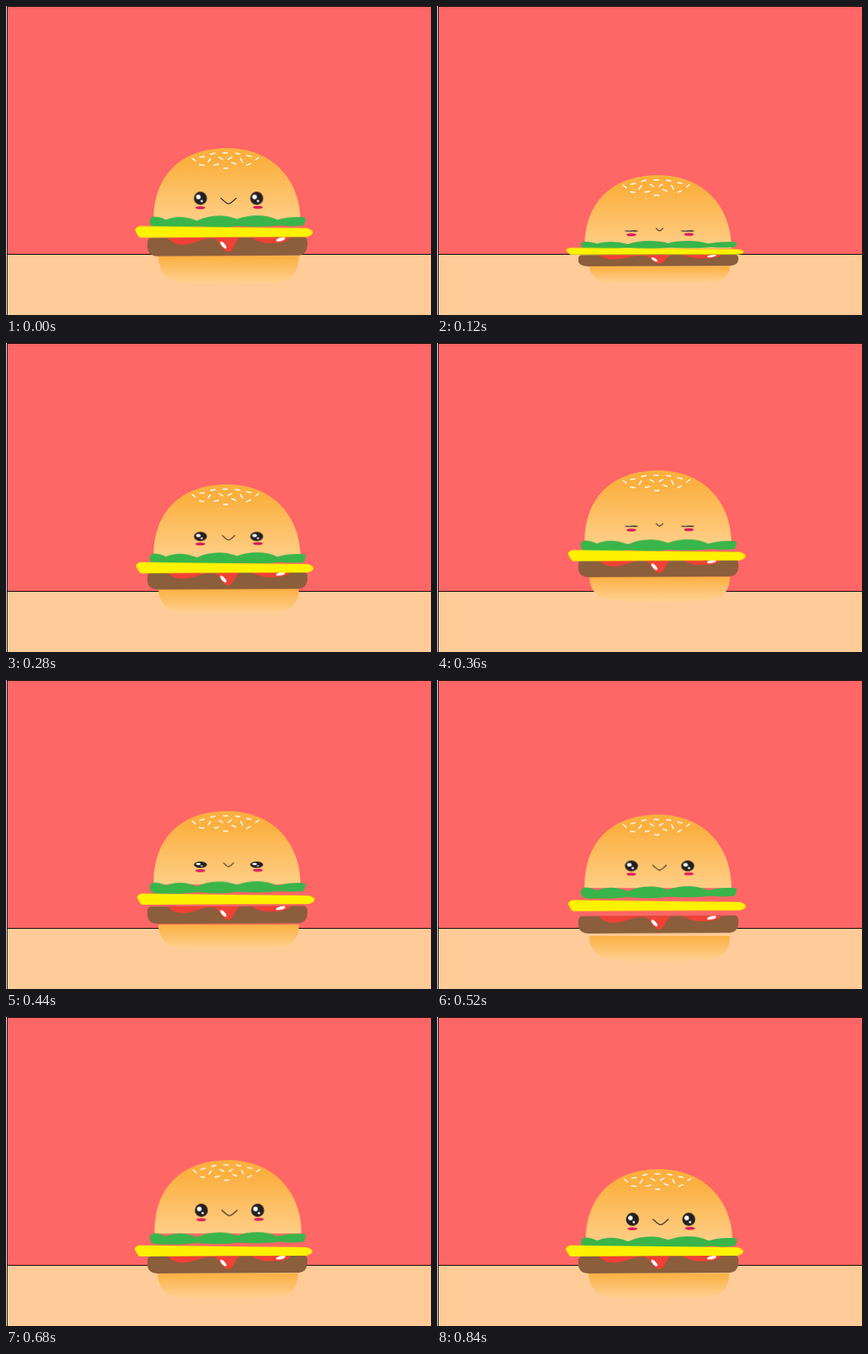
Recreate the animation shown at these times as an HTML page. Size 550 by 400 pixels, loop 2.4 s.

```html
<!DOCTYPE html>
<html lang="en">
<head>
<meta charset="utf-8">
<title>Hopping burger</title>
<style>
html, body { margin: 0; width: 100%; height: 100%; overflow: hidden; background: #fff; }
svg { display: block; width: 550px; height: 400px; }

/* Each layer sits at y = 0 locally; keyframes place it. Steps of 40 ms. */
.part { animation: 2400ms infinite; }
#base { animation-name: base; }
#patty { animation-name: patty; }
#lettuce { animation-name: lettuce; }
#cheese { animation-name: cheese; }
#bun { animation-name: bun; }
.eye { animation-name: blink; }
#mouth { animation-name: pout; }

@keyframes base {
  0% { transform: translate(0px, 360px) scale(1, 1.13); animation-timing-function: steps(3); }
  5% { transform: translate(0px, 359px) scale(1, .68); animation-timing-function: steps(3); }
  10% { transform: translate(0px, 358px) scale(1, 1); animation-timing-function: steps(3); }
  15% { transform: translate(0px, 334.5px) scale(1, 1); animation-timing-function: steps(4); }
  21.6667% { transform: translate(0px, 363.5px) scale(1, 1); animation-timing-function: steps(1); }
  23.3333% { transform: translate(-.3px, 364px) scale(1, 1); animation-timing-function: steps(3); }
  28.3333%, 100% { transform: translate(-1px, 364.3px) scale(1, 1); }
}
@keyframes patty {
  0% { transform: translate(0px, 324px) scale(1, 1.07); animation-timing-function: steps(3); }
  5% { transform: translate(0px, 337px) scale(1, .65); animation-timing-function: steps(3); }
  10% { transform: translate(0px, 327.2px) scale(1, 1); animation-timing-function: steps(3); }
  15% { transform: translate(0px, 303.2px) scale(1, 1); animation-timing-function: steps(4); }
  21.6667% { transform: translate(0px, 328.2px) scale(1, 1); animation-timing-function: steps(1); }
  23.3333%, 100% { transform: translate(0px, 332px) scale(1, 1); }
}
@keyframes lettuce {
  0% { transform: translate(0px, 287.5px) scale(1, 1.02); animation-timing-function: steps(3); }
  5% { transform: translate(0px, 314.4px) scale(1, .65); animation-timing-function: steps(3); }
  10% { transform: translate(0px, 295.5px) scale(1, 1); animation-timing-function: steps(3); }
  15% { transform: translate(0px, 270.2px) scale(1, 1); animation-timing-function: steps(5); }
  23.3333% { transform: translate(0px, 286.2px) scale(1, 1); animation-timing-function: steps(5); }
  31.6667%, 100% { transform: translate(.3px, 300px) scale(1, 1); }
}
@keyframes cheese {
  0% { transform: translate(0px, 300px) scale(1, 1.04); animation-timing-function: steps(3); }
  5% { transform: translate(0px, 322.3px) scale(1, .64); animation-timing-function: steps(3); }
  10% { transform: translate(.3px, 306px) scale(1, 1); animation-timing-function: steps(3); }
  15% { transform: translate(2.3px, 282.5px) scale(1, 1); animation-timing-function: steps(5); }
  23.3333% { transform: translate(2.5px, 303.5px) scale(1, 1); animation-timing-function: steps(3); }
  28.3333%, 100% { transform: translate(-.6px, 310px) scale(1, 1); }
}
@keyframes bun {
  0% { transform: translate(0px, 184px); animation-timing-function: steps(3); }
  5% { transform: translate(0px, 219px); animation-timing-function: steps(6); }
  15% { transform: translate(0px, 165px); animation-timing-function: steps(5); }
  23.3333% { transform: translate(0px, 176.5px); animation-timing-function: steps(3); }
  28.3333% { transform: translate(1.2px, 185.3px); animation-timing-function: steps(4); }
  35%, 100% { transform: translate(1.4px, 197px); }
}
@keyframes blink {
  0%, 10% { transform: scale(1, 1); animation-timing-function: steps(3); }
  5% { transform: scale(1, .12); animation-timing-function: steps(3); }
  15% { transform: scale(1, .12); animation-timing-function: steps(5); }
  23.3333%, 100% { transform: scale(1, 1); }
}
@keyframes pout {
  0%, 10% { transform: scale(1); animation-timing-function: steps(3); }
  5% { transform: scale(.45); animation-timing-function: steps(3); }
  15% { transform: scale(.45); animation-timing-function: steps(5); }
  23.3333%, 100% { transform: scale(1); }
}
</style>
</head>
<body>
<svg viewBox="0 0 550 400">
  <defs>
    <linearGradient id="crust" x1="0" y1="0" x2="0" y2="1">
      <stop offset=".18" stop-color="#fbb040"/>
      <stop offset="1" stop-color="#ffcf88"/>
    </linearGradient>
    <linearGradient id="heel" x1="0" y1="0" x2="0" y2="1">
      <stop offset="0" stop-color="#fbb040"/>
      <stop offset=".95" stop-color="#ffcf90"/>
    </linearGradient>
    <g id="eyeShape">
      <ellipse cy="-8.4" rx="8.4" ry="8.5" fill="#231f20"/>
      <circle cx="-2.7" cy="-10.2" r="3" fill="#fff"/>
      <circle cx="1.7" cy="-5" r="1.6" fill="#fff"/>
    </g>
  </defs>

  <path d="M1 0H550V322H1Z" fill="#f66"/>
  <path d="M1 322H550V400H1Z" fill="#fc9"/>
  <path d="M1 0H550V1H2V321H550V322H2V400H1Z"/>

  <path id="base" class="part" fill="url(#heel)"
    d="M197-32.5H379C379-18 373-5 357-2.5C330 .5 245 1 221-2.5C204-5 198-18 197-32.5Z"/>

  <g id="patty" class="part">
    <path fill="#8b5e3c" d="M187-22.5L386-23.5Q390-22 390-18V-13Q389-2 379-1L195 0Q184-1 183-10V-17Q183-21 187-22.5Z"/>
    <path fill="#ef4136" d="M209-22.5C216-14 227-12.5 240-15.5C250-18 256-22 268-21.5C277-20.5 279-5.5 288-5.5C295-6 296-19 303-22.5H318C326-17 335-15.5 347-16C358-16.5 365-18 368-23Z"/>
    <g fill="#fff">
      <ellipse rx="5.3" ry="2.2" transform="translate(281.3-13.6)rotate(47)"/>
      <ellipse rx="6.2" ry="2.1" transform="translate(355.5-20.5)rotate(-14)"/>
    </g>
  </g>

  <g id="bun" class="part">
    <path fill="url(#crust)" d="M191 95V92C191 36 226 0 286 0C346 0 381 42 381 95Z"/>
    <path fill="none" stroke="#fff" stroke-width="1.5" stroke-linecap="round"
      d="M241 13l4 3.4M251 11.8l5.5-1M265 8l5.5-1.4M281 6.2h5.5M297 6.4l5.5 1M311.500 9.600l5.500 1.200M323 15l4-3
         M261.500 18l3-4.500M276 11.800l4.500 3M287.500 14.600l4.500-3M303.500 13.200l2.500 5M250.500 21.500l5.500 .8M269.500 22l5.500-1.300M292.500 18.500l5 2.300M311.500 22.300l5-2.500M281.500 26h5.500"/>
    <g fill="#da1c5c">
      <ellipse cx="251.500" cy="77.200" rx="6.300" ry="1.900"/>
      <ellipse cx="326" cy="76.700" rx="6.300" ry="1.900"/>
    </g>
    <g transform="translate(251.600 73.400)"><use class="part eye" href="#eyeShape"/></g>
    <g transform="translate(324.400 73.400)"><use class="part eye" href="#eyeShape"/></g>
    <g transform="translate(288 72)">
      <path id="mouth" class="part" fill="none" stroke="#231f20" stroke-width="1.100" vector-effect="non-scaling-stroke"
        d="M-10.300-7.500C-6.500-4.500-3 0 0 0S6.500-4.500 10.300-7.500"/>
    </g>
  </g>

  <path id="lettuce" class="part" fill="#39b54a"
    d="M186-9C186-12 188-14 191-14.500C197-14.500 202-13 207-10.500C219-16 234-15 247-9.500C263-17 282-18 299-11.500C316-17.500 336-17.500 351-10.500C361-13.500 371-14.500 382-14Q388-14 388-11L386-5Q385-2.800 380-3Q367-2 355-3.500Q328 0 302-2.500Q275 1 247-2Q222 1 206-.5Q196 1 190-1.500Q186-3 186-9Z"/>

  <path id="cheese" class="part" fill="#fff200"
    d="M173-14.500Q230-14 290-13L389-12Q397-10 397-6.500Q396-2.500 389-1L290-.8L175 0Q172 0 170-4L167.200-9Q167-13 173-14.500Z"/>
</svg>
</body>
</html>
```
